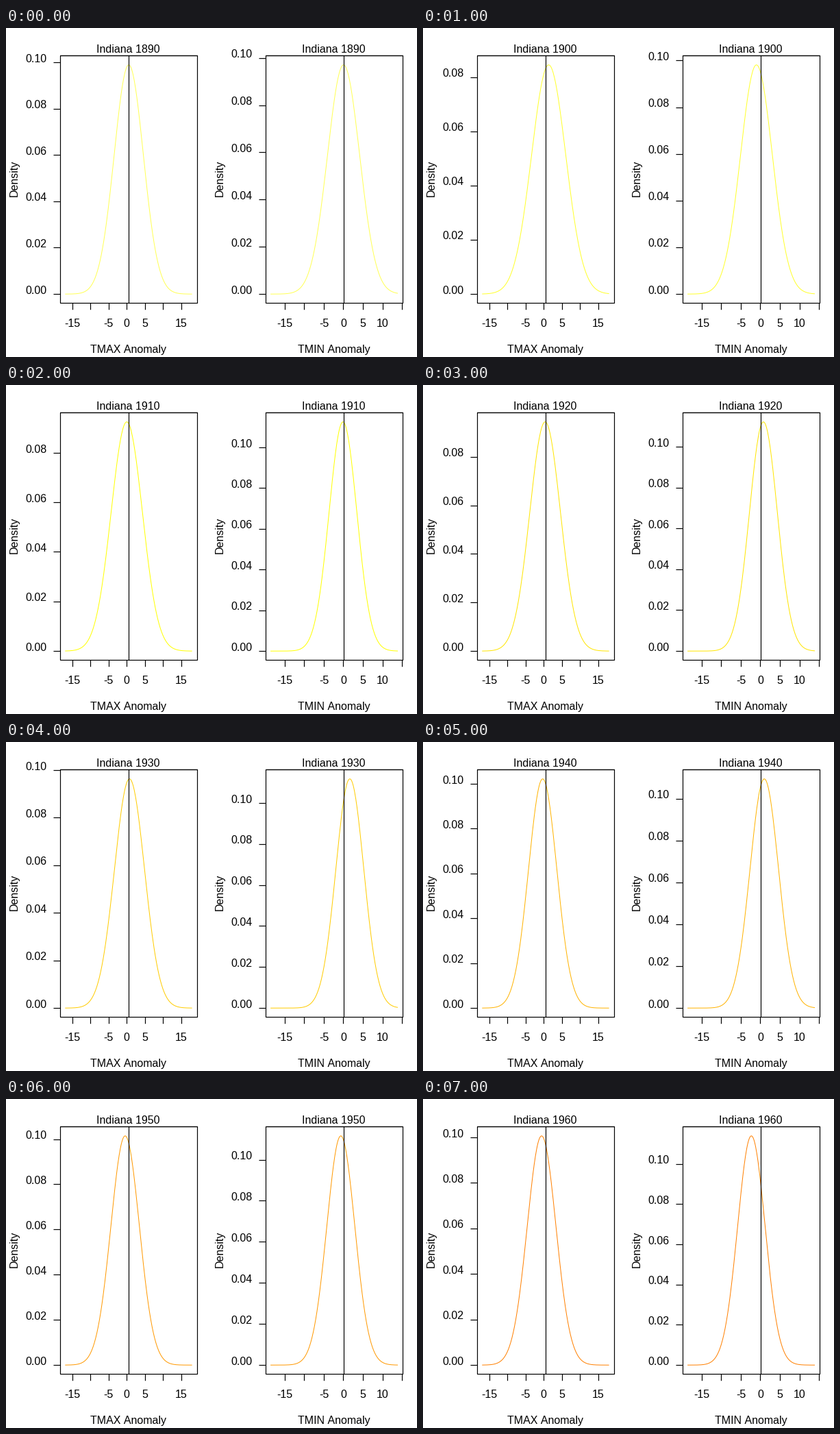
A matplotlib script that plays this animation: 600x480 px, repeating every 8000 ms.

```python
import math

import numpy as np
import matplotlib.pyplot as plt
from matplotlib.animation import FuncAnimation

W, H, DPI = 600, 480, 100
PX = 72 / DPI                    # one pixel in points
TOP, BOTTOM = 40.5, 401.5        # plot box
BASE, CURVE_H = 388.2, 334.4     # zero density, height of the peak
START, DECADES = 1890, 8

plt.rcParams["font.family"] = "Liberation Sans"
plt.rcParams["font.size"] = 16 * PX

fig = plt.figure(figsize=(W / DPI, H / DPI), dpi=DPI, facecolor="white")
ax = fig.add_axes([0, 0, 1, 1])
ax.set_xlim(0, W)
ax.set_ylim(H, 0)
ax.axis("off")


def line(xs, ys, width=1.2, z=2):
    return ax.plot(xs, ys, color="black", lw=width * PX, zorder=z, snap=False,
                   solid_capstyle="butt", solid_joinstyle="miter")[0]


def text(x, y, s, ha="center", **kw):
    return ax.text(x, y, s, ha=ha, va="baseline", **kw)


def pixel(v):
    return math.floor(v) + 0.5


def heat(i):
    """Pale yellow, full yellow at the third decade, then towards red."""
    step = i - 2
    return (1, 1 - 0.1 * max(step, 0), max(-step, 0) / 6)


class Panel:
    def __init__(self, left, name, origin, scale, span, mark, last, fits):
        """fits maps a year to (mean, spread); years between are blended."""
        self.left, self.origin, self.scale = left, origin, scale
        self.years = list(fits)
        self.means, self.spreads = zip(*fits.values())
        self.x = np.linspace(*span, 201)
        right = left + 200
        line([left, right, right, left, left, right],
             [TOP, TOP, BOTTOM, BOTTOM, TOP, TOP])
        line([mark, mark], [TOP, BOTTOM], z=3)
        for v in range(-15, 16, 5):
            x = origin + scale * v
            line([pixel(x + 0.3)] * 2, [BOTTOM, 411.2])
            if v != -10 and (v <= 5 or v == last):
                text(x, 436, str(v))
        text(left + 99.3, 474, name + "\u00a0Anomaly")
        text(left - 62.5, 219, "Density", rotation=90, rotation_mode="anchor")
        self.title = text(left + 99, 35.6, "")
        self.curve = line([], [], width=1, z=1)
        self.ticks = []

    def show(self, i):
        year = START + 10 * i
        mean = np.interp(year, self.years, self.means)
        sd = np.interp(year, self.years, self.spreads)
        peak = 1 / (sd * math.sqrt(2 * math.pi))
        bell = np.exp(-((self.x - mean) / sd) ** 2 / 2)
        self.curve.set_data(self.origin + self.scale * self.x,
                            BASE - CURVE_H * bell)
        self.curve.set_color(heat(i))
        self.title.set_text(f"Indiana {year}")

        for artist in self.ticks:
            artist.remove()
        self.ticks = []
        for v in np.arange(0, peak * 1.04, 0.02):
            y = BASE - CURVE_H * v / peak
            self.ticks.append(line([self.left - 10, self.left],
                                   [pixel(y + 0.2)] * 2))
            self.ticks.append(text(self.left - 19.7, y - 0.7, f"{v:.2f}",
                                   ha="right"))


panels = [
    Panel(79.5, "TMAX", 176.3, 5.295, (-17, 18), 179.5, 15,
          {1890: (0.55, 4.03), 1900: (1.35, 4.715), 1910: (0, 4.308),
           1930: (0.75, 4.138), 1940: (-0.3, 3.9), 1960: (-0.6, 3.958)}),
    Panel(379.5, "TMIN", 492.5, 5.72, (-18.6, 13.9), 493.5, 10,
          {1890: (0.05, 4.104), 1900: (-1, 4.062), 1910: (-0.1, 3.543),
           1930: (1.65, 3.565), 1940: (1, 3.643), 1960: (-2.3, 3.499)}),
]


def update(i):
    for p in panels:
        p.show(i)
    return []


anim = FuncAnimation(fig, update, frames=DECADES, interval=1000,
                     init_func=lambda: update(0), repeat=True,
                     repeat_delay=0, blit=False)
plt.show()
```
